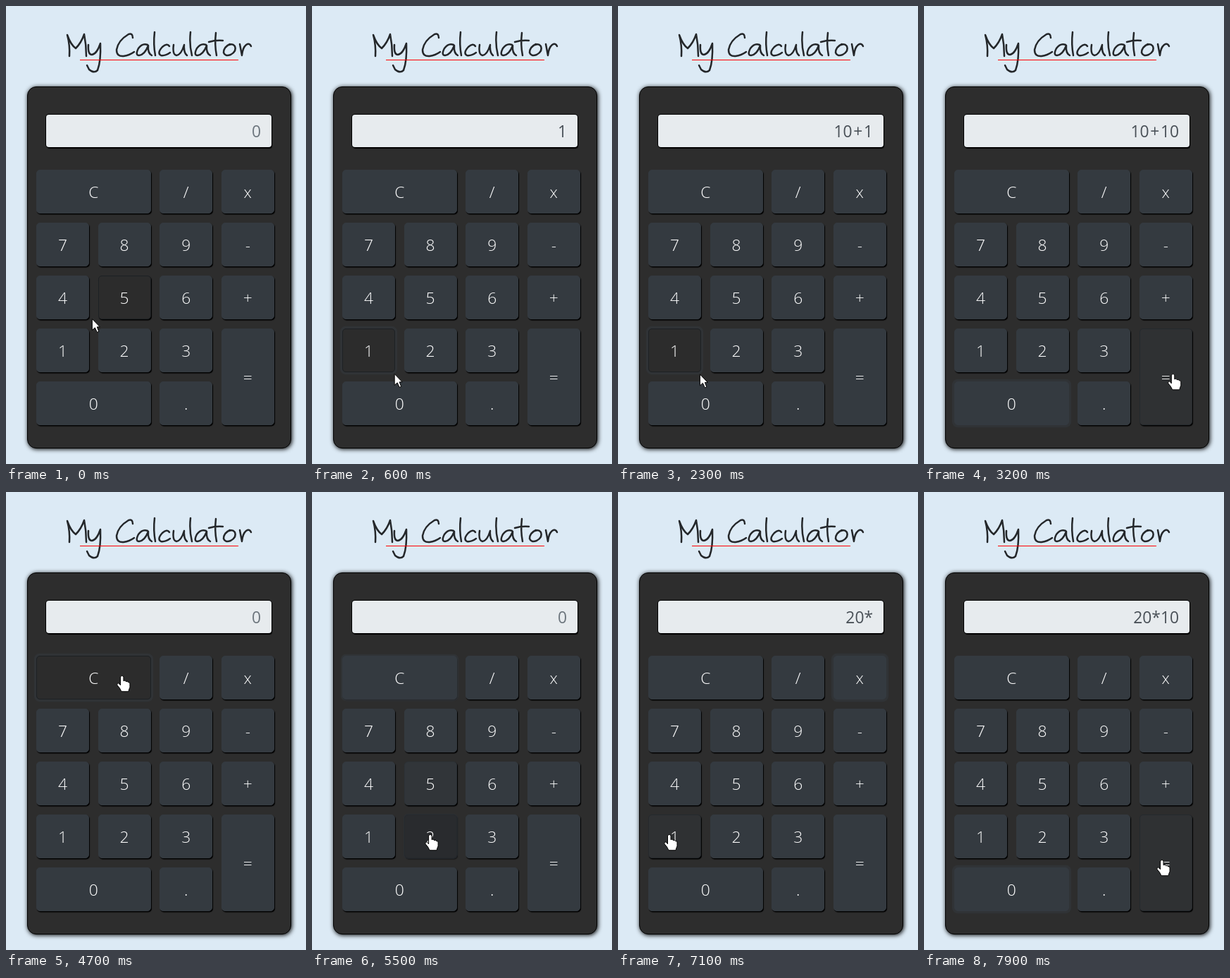
Write an HTML page that moves like this. It is 426x649 px and loops after 8000 ms.

```html
<!DOCTYPE html>
<html lang="en">
<head>
<meta charset="utf-8">
<title>My Calculator</title>
<style>
  html, body { margin: 0; width: 100%; height: 100%; overflow: hidden; background: #dceaf5; }
  body { position: relative; font: 22.8px "Open Sans", "Noto Sans", sans-serif; }
  #panel, #display, button, svg { position: absolute; box-sizing: border-box; }
  #panel { left: 30px; top: 114px; width: 375px; height: 513px; background: #2d2d2d;
    border: 1px solid #000; border-radius: 13px; box-shadow: 1px 1px 6px #000; }
  #display { left: 57px; top: 154px; width: 320px; height: 46px; padding-right: 15px;
    line-height: 48px; text-align: right; background: #e7ebee; border-radius: 4px;
    box-shadow: 0 0 0 1px #000, 1px 2px 1px #000; }
  #display b { font-weight: 400; padding: 0 1.7px; }
  button { margin: 0; padding: 0; border: 1px solid; border-radius: 5px; font: inherit;
    font-weight: 300; color: #fff; cursor: inherit; }
  svg { left: 0; top: 0; pointer-events: none; }
</style>
</head>
<body>
<svg width="426" height="110" role="img" aria-label="My Calculator" fill="none"
  stroke="#24272a" stroke-width="2.5" stroke-linecap="round" stroke-linejoin="round">
  <path d="M87 41Q91 56 90 71M87 41Q92 55 99 60Q107 52 111 40Q114 55 114 71"/>
  <path d="M117 55Q116 69 122 69Q129 68 134 53Q135 78 130 91Q125 96 118 90L115 84"/>
  <path d="M180 45Q180 38 174 40Q159 49 157 62Q157 72 167 71Q175 70 182 65"/>
  <path d="M201 55Q194 52 188 60Q183 70 189 70Q197 69 202 56Q201 67 207 70"/>
  <path d="M211 37Q209 54 212 70M232 57Q229 52 222 58Q214 67 220 70Q226 71 233 66"/>
  <path d="M238 55Q236 69 242 70Q249 69 253 55Q252 66 257 70M262 37Q260 54 264 70"/>
  <path d="M284 55Q277 52 271 60Q266 70 272 70Q280 69 285 56Q284 67 290 70"/>
  <path d="M298 38Q296 55 299 70M288 51Q298 48 308 49"/>
  <path d="M318 54Q309 58 309 66Q311 72 319 69Q328 64 325 57Q322 53 317 55"/>
  <path d="M332 54L335 70Q336 59 341 55Q346 52 348 57"/>
  <path d="M105 76.5H330" stroke="red" stroke-width="1" stroke-linecap="butt"/>
</svg>
<div id="panel"></div>
<div id="display"></div>
<script>
const LOOP = 8000, STEP = 100;
const BASE = [52, 58, 64], HOVER = [44, 44, 44], EDGE = [29, 33, 36];
const HAND = 'M-2.5 0Q0-3 2 0V6Q4 4 5.5 7Q8 5.5 8.5 8Q11 7 11 10V15Q9.5 18 9 21H-1Q-3 16-7 12Q-8 9-5 9L-2.5 12Z';
const ARROW = 'M0 0V16L4 12.5 7 19 9.5 18 7 11.5H11Z';

// One character per grid cell; repeated labels span cells
const layout = ['CC/x', '789-', '456+', '123=', '00.='];
const keys = {};
layout.forEach((row, r) => [...row].forEach((label, c) => {
  const x = 43 + 87.6 * c, y = 232 + 75 * r;
  const key = keys[label] ??= { x, y };
  key.w = x + 75 - key.x;
  key.h = y + 62 - key.y;
}));
for (const [label, k] of Object.entries(keys)) {
  k.el = document.createElement('button');
  k.el.textContent = label;
  k.el.tabIndex = -1;
  k.el.style.cssText = `left:${k.x}px;top:${k.y}px;width:${k.w}px;height:${k.h}px`;
  document.body.append(k.el);
}

// Press time, key, how far across the key the pointer lands
const visits = [
  [-500, '5', 0.7], [190, '1', 0.65], [770, '0', 0.52], [1378, '+', 0.6],
  [1970, '1', 0.6], [2470, '0', 0.52], [3270, '=', 0.64], [4480, 'C', 0.75],
  [5470, '2', 0.5], [5770, '0', 0.52], [6370, 'x', 0.6], [7085, '1', 0.4],
  [7370, '0', 0.52], [7960, '=', 0.43]
].map(([press, label, across]) => {
  const k = keys[label];
  return { press, label, x: k.x + k.w * across, y: k.y + k.h * 0.48 };
});

let value = '0';
visits.forEach((v, i) => {
  const from = visits[i - 1] ?? v;
  v.arrive = v.press - 60;
  v.leave = v.arrive - 100 - 0.6 * Math.hypot(v.x - from.x, v.y - from.y);
  if (!i || v.label === 'C') value = '0';
  else if (v.label === '=') value = String(value.split('+').reduce((a, b) => +a + +b));
  else value = (value === '0' ? '' : value) + v.label.replace('x', '*');
  v.value = value;
});

document.body.insertAdjacentHTML('beforeend', `<svg width="426" height="649">
  <path id="pointer" fill="#fff" stroke="#000" stroke-linejoin="round"/></svg>`);
const pointer = document.getElementById('pointer');
const display = document.getElementById('display');

const quantize = t => Math.floor(t / STEP) * STEP;
const mix = (a, b, k) => a.map((v, i) => v + (b[i] - v) * k);
const rgb = (c, alpha = 1) => `rgba(${c.map(Math.round)},${alpha})`;
const easeOut = (k, power) => 1 - (1 - k) ** power;
const lastPress = t => visits.findLast(v => v.press <= t) ?? visits[0];

// Sideways motion settles sooner than vertical motion
function tip(t) {
  t = quantize(t);
  const i = Math.max(1, visits.findLastIndex(v => v.leave <= t));
  const from = visits[i - 1], to = visits[i];
  const k = Math.min(1, Math.max(0, (t - to.leave) / (to.arrive - to.leave)));
  return {
    x: from.x + (to.x - from.x) * easeOut(k, 4),
    y: from.y + (to.y - from.y) * easeOut(k, 2)
  };
}

const over = (k, { x, y }) => x >= k.x && x <= k.x + k.w && y >= k.y && y <= k.y + k.h;

// Recent states averaged into a short fade
const fade = (t, test) => [20, 70, 120].filter(d => test(t - d)).length / 3;

function draw(t) {
  for (const [label, k] of Object.entries(keys)) {
    const hover = fade(t, s => over(k, tip(s)));
    const focus = fade(t, s => lastPress(s) !== visits[0] && lastPress(s).label === label);
    const active = fade(t, s => lastPress(s).label === label && s - lastPress(s).press < 100);
    const ring = rgb(mix(BASE, EDGE, active), 0.5 + 0.4 * active);
    k.el.style.backgroundColor = rgb(mix(mix(BASE, HOVER, hover), EDGE, active));
    k.el.style.borderColor = rgb(mix(BASE, EDGE, hover));
    k.el.style.boxShadow =
      `0 0 0 ${3.2 * focus}px ${ring}, 1px 1.5px 1px ${rgb([0, 0, 0], 1 - focus)}`;
  }
  const shown = lastPress(t - 125).value;
  display.innerHTML = shown.replace('+', '<b>+</b>');
  display.style.color = shown === '0' ? '#6c757d' : '#495057';
  const at = tip(t);
  pointer.setAttribute('d', Object.values(keys).some(k => over(k, at)) ? HAND : ARROW);
  pointer.setAttribute('transform', `translate(${at.x},${at.y})`);
}

const start = performance.now();
function tick() {
  draw(quantize((performance.now() - start) % LOOP));
  requestAnimationFrame(tick);
}
tick();
</script>
</body>
</html>
```
